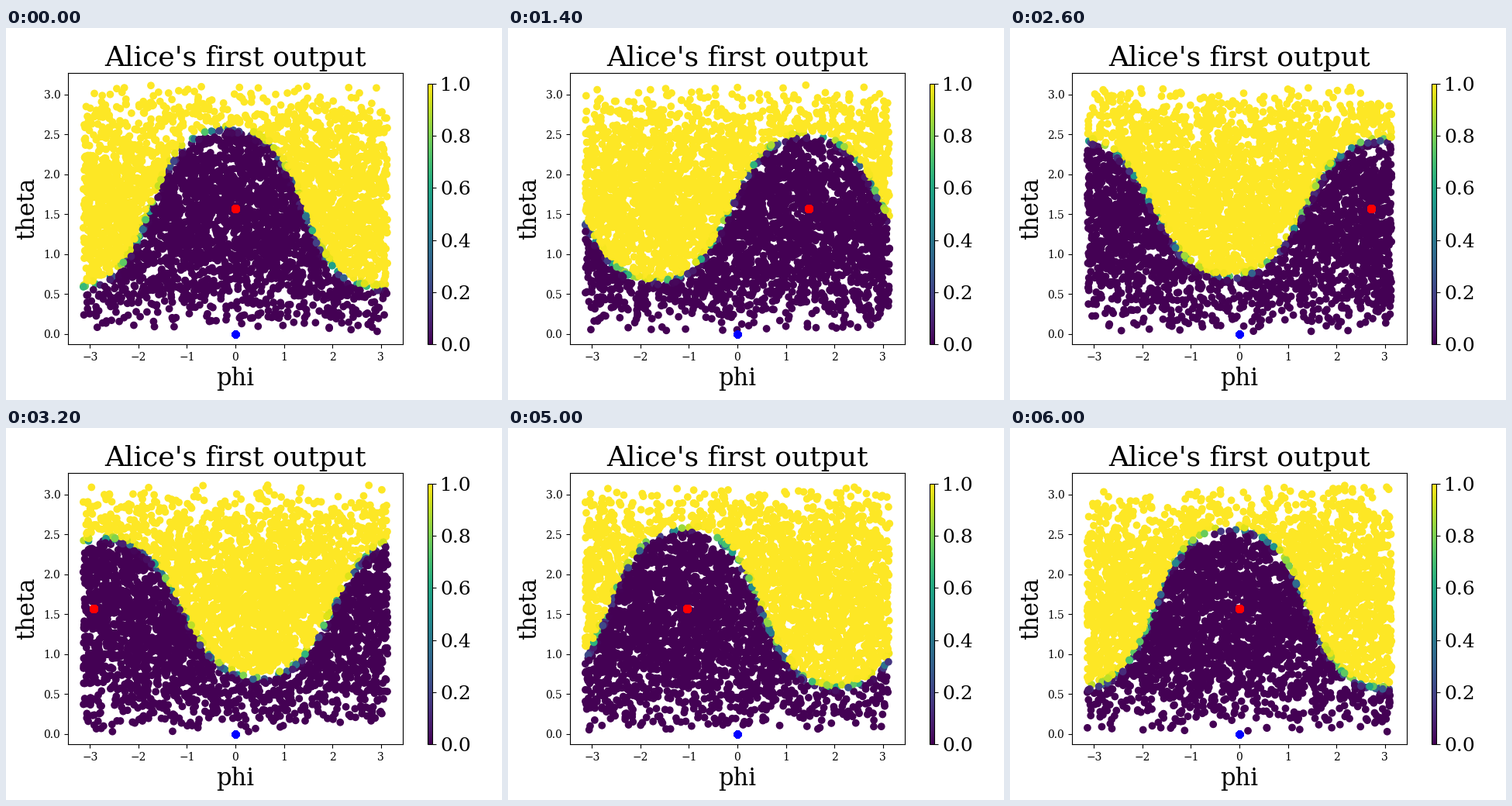
A matplotlib script that plays this animation: 640 px wide and 480 px high, repeating every 6.2 s.

```python
import numpy as np
import matplotlib.pyplot as plt
from matplotlib.animation import FuncAnimation
from matplotlib.cm import ScalarMappable

FRAMES, STEP_MS = 31, 200
POINTS, COPIES = 4000, 200
SHARPNESS = 85
THETA_MIN, THETA_MAX = 0.027, 3.118

plt.rcParams["font.family"] = "DejaVu Serif"


def wrap(angle):
    return (angle + np.pi) % (2 * np.pi) - np.pi


def padded(lo, hi):
    pad = 0.05 * (hi - lo)
    return lo - pad, hi + pad


def sample_sphere(seed):
    rng = np.random.default_rng(seed)
    phi = rng.uniform(-np.pi, np.pi, POINTS)
    height = rng.uniform(np.cos(THETA_MAX), np.cos(THETA_MIN), POINTS)
    return phi, np.arccos(height)


def response(phi, theta, turn):
    """Soft step across a tilted great circle that wobbles as it turns."""
    peak = turn + 0.03 - 0.21 * np.cos(turn - 0.2)
    gain = 1.36 + 0.2 * np.cos(turn + 0.4)
    side = np.cos(theta) + gain * np.sin(theta) * np.cos(phi - peak)
    return 1 / (1 + np.exp(SHARPNESS * side / np.hypot(1, gain)))


def heavy_dot(ax, x, y, color, size):
    # Stacked copies harden the antialiased edge
    return ax.scatter(np.full(COPIES, x), np.full(COPIES, y), s=size, color=color)


fig, ax = plt.subplots(figsize=(6.4, 4.8), dpi=100)
fig.subplots_adjust(left=0.125, right=0.8, bottom=0.15, top=0.88)
ax.set_title("Alice's first output", fontsize=26)
ax.set_xlabel("phi", fontsize=22)
ax.set_ylabel("theta", fontsize=22)

cloud = ax.scatter(np.zeros(POINTS), np.zeros(POINTS), c=np.zeros(POINTS),
                   cmap="viridis", vmin=0, vmax=1)
red = heavy_dot(ax, 0, np.pi / 2, "red", 46)
blue = heavy_dot(ax, 0, 0, "blue", 36)
ax.set_xlim(padded(-np.pi, np.pi))
ax.set_ylim(padded(THETA_MIN, THETA_MAX))

cax = fig.add_axes([0.85, 0.15, 0.01, 0.7])
bar = fig.colorbar(ScalarMappable(cmap="viridis"), cax=cax)
bar.set_ticks(np.linspace(0, 1, 6))
bar.ax.tick_params(labelsize=18)


def update(i):
    turn = 2 * np.pi * i / (FRAMES - 1)
    phi, theta = sample_sphere(100 + i)
    cloud.set_offsets(np.column_stack([phi, theta]))
    cloud.set_array(response(phi, theta, turn))
    red.set_offsets(np.tile([wrap(turn), np.pi / 2], (COPIES, 1)))
    return cloud, red, blue


anim = FuncAnimation(fig, update, frames=FRAMES, interval=STEP_MS,
                     repeat=True, repeat_delay=0, blit=False)
plt.show()
```
